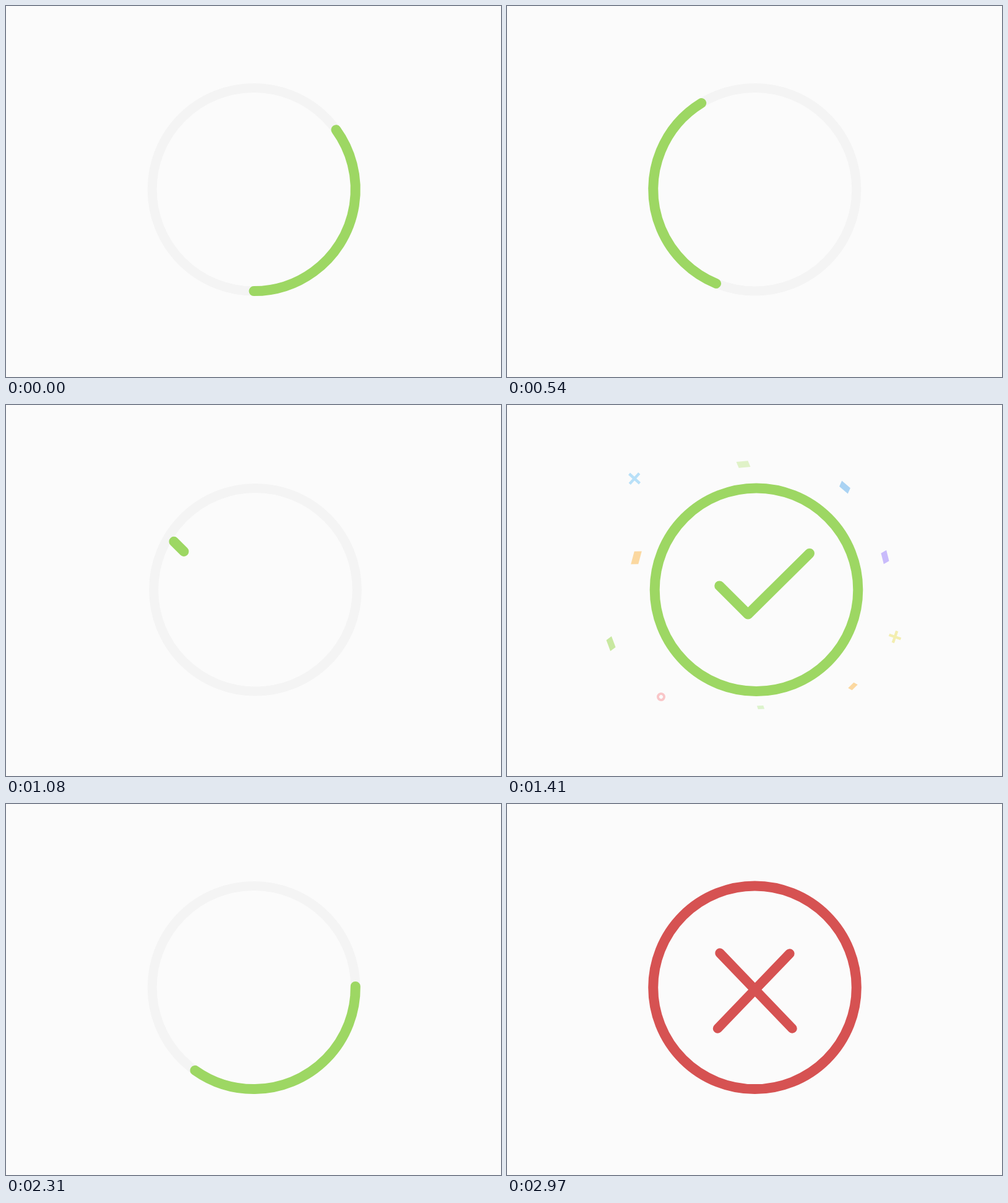
An HTML page with a canvas for the animation above (3330 ms loop, 800 px wide and 600 px high).

```html
<!DOCTYPE html>
<html lang="en">
<head>
<meta charset="utf-8">
<title>Loading, success, failure</title>
<style>
html, body { margin: 0; width: 100%; height: 100%; overflow: hidden; background: #fbfbfb; }
canvas { display: block; }
</style>
</head>
<body>
<canvas id="stage" width="800" height="600"></canvas>
<script>
const ctx = document.getElementById('stage').getContext('2d');
const LOOP = 3330, STEP = 30, R = 164.3;
const GREEN = [157, 215, 99], RED = [214, 82, 82];
const TURN = 28.24 / STEP;              // spinner speed, degrees per ms
const CHECK = [[262.5, 212], [389.5, 338.5], [489, 240]];
const CROSS = [
  [[284.5, 179], [461, 363]],
  [[516.5, 180], [340.5, 363]]
];
// Shape, colour, final centre and length of each piece.
const CONFETTI = [
  [shred, '#e0f2c8', 382, 96, 22],
  [shred, '#aad3f3', 546, 133, 21],
  [shred, '#c9bbfb', 611, 246, 21],
  [plus, '#f3eeb0', 627, 375, 20],
  [shred, '#fbd8a0', 559, 455, 15],
  [shred, '#dcf3cc', 410, 489, 12],
  [hoop, '#f9c6c8', 249, 472, 14],
  [shred, '#c8e8a0', 168, 386, 22],
  [shred, '#fbd8a0', 209, 247, 25],
  [plus, '#b8e0f8', 206, 119, 23]
];

const progress = (t, from, to) => Math.min(1, Math.max(0, (t - from) / (to - from)));
const smooth = p => p * p * (3 - 2 * p);
const rgb = c => `rgb(${c.join(',')})`;
const mix = (a, b, p) => rgb(a.map((v, i) => Math.round(v + (b[i] - v) * p)));

function arc(x, y, from, to, color, width) {
  const rad = deg => (deg - 90) * Math.PI / 180;
  ctx.beginPath();
  ctx.arc(x, y, R, rad(from), rad(to));
  ctx.strokeStyle = color;
  ctx.lineWidth = width;
  ctx.stroke();
}

function ring(x, y, color, alpha) {
  ctx.globalAlpha = alpha;
  arc(x, y, 0, 360, color, 16);
  ctx.globalAlpha = 1;
}

// Both ends run at one speed and settle softly at the stop angle.
function spinner(t, x, y, stop, color) {
  const settle = angle => {
    const gap = stop - angle;
    return stop - (gap > 21 ? gap : 21 * Math.exp((gap - 21) / 21));
  };
  arc(x, y, settle(54 + t * TURN), settle(180 + t * TURN), color, 16);
}

// Strokes the part of a polyline between two distances from its start.
function trim(points, from, to, color, width) {
  if (to <= from) return;
  let done = 0;
  ctx.beginPath();
  for (let i = 1; i < points.length; i++) {
    const [ax, ay] = points[i - 1], [bx, by] = points[i];
    const len = Math.hypot(bx - ax, by - ay);
    const a = Math.max(0, from - done) / len, b = Math.min(len, to - done) / len;
    if (b > a) {
      if (from >= done) ctx.moveTo(ax + (bx - ax) * a, ay + (by - ay) * a);
      ctx.lineTo(ax + (bx - ax) * b, ay + (by - ay) * b);
    }
    done += len;
  }
  ctx.strokeStyle = color;
  ctx.lineWidth = width;
  ctx.stroke();
}

function shred(size) {
  const long = size / 2, short = size * 0.36, half = size * 0.23;
  ctx.moveTo(-long, -half);
  ctx.lineTo(short, -half);
  ctx.lineTo(long, half);
  ctx.lineTo(-short, half);
  ctx.fill();
}

function plus(size) {
  ctx.rect(-size / 2, -2.2, size, 4.4);
  ctx.rect(-2.2, -size / 2, 4.4, size);
  ctx.fill();
}

function hoop(size) {
  ctx.arc(0, 0, size / 2 - 2, 0, Math.PI * 2);
  ctx.lineWidth = 4;
  ctx.stroke();
}

// Pieces fly outward from the middle, each lying across its own path.
function confetti(p, x, y) {
  const reach = 0.7 + 0.3 * (1 - (1 - p) ** 3);
  for (const [shape, color, px, py, size] of CONFETTI) {
    const dx = px - x, dy = py - y;
    ctx.save();
    ctx.globalAlpha = Math.min(1, p * 2);
    ctx.translate(x + dx * reach, y + dy * reach);
    ctx.rotate(Math.atan2(dy, dx) + Math.PI / 2);
    ctx.fillStyle = ctx.strokeStyle = color;
    ctx.beginPath();
    shape(size);
    ctx.restore();
  }
}

function draw(t) {
  const success = t >= 960 && t < 1890;
  const x = success ? 403 : 400.5, y = success ? 298.7 : 296.8;
  ctx.fillStyle = '#fbfbfb';
  ctx.fillRect(0, 0, 800, 600);
  ctx.lineCap = ctx.lineJoin = 'round';
  arc(x, y, 0, 360, '#f4f4f4', 15);

  if (t < 1890) {
    if (t < 1060) spinner(t, x, y, 1021.5, rgb(GREEN));
    ring(x, y, rgb(GREEN), progress(t, 1170, 1350));
    const p = smooth(progress(t, 1028, 1280));
    trim(CHECK, 114 * p, 320 * p, rgb(GREEN), 16);
    if (t > 1230 && t < 1830) confetti(progress(t, 1230, 1410), x, y);
  } else {
    if (t < 2600) spinner(t - 1890, x, y, 676.9, mix(GREEN, RED, progress(t, 2460, 2550)));
    ring(x, y, rgb(RED), progress(t, 2700, 2880));
    CROSS.forEach((line, i) => {
      const p = smooth(progress(t, 2590 + i * 190, 2780 + i * 190));
      trim(line, 86 * p, 255 * p, rgb(RED), 15.5);
    });
  }
}

const start = performance.now();
function frame() {
  const t = (performance.now() - start) % LOOP;
  draw(Math.floor(t / STEP) * STEP);
  requestAnimationFrame(frame);
}
frame();
</script>
</body>
</html>
```
